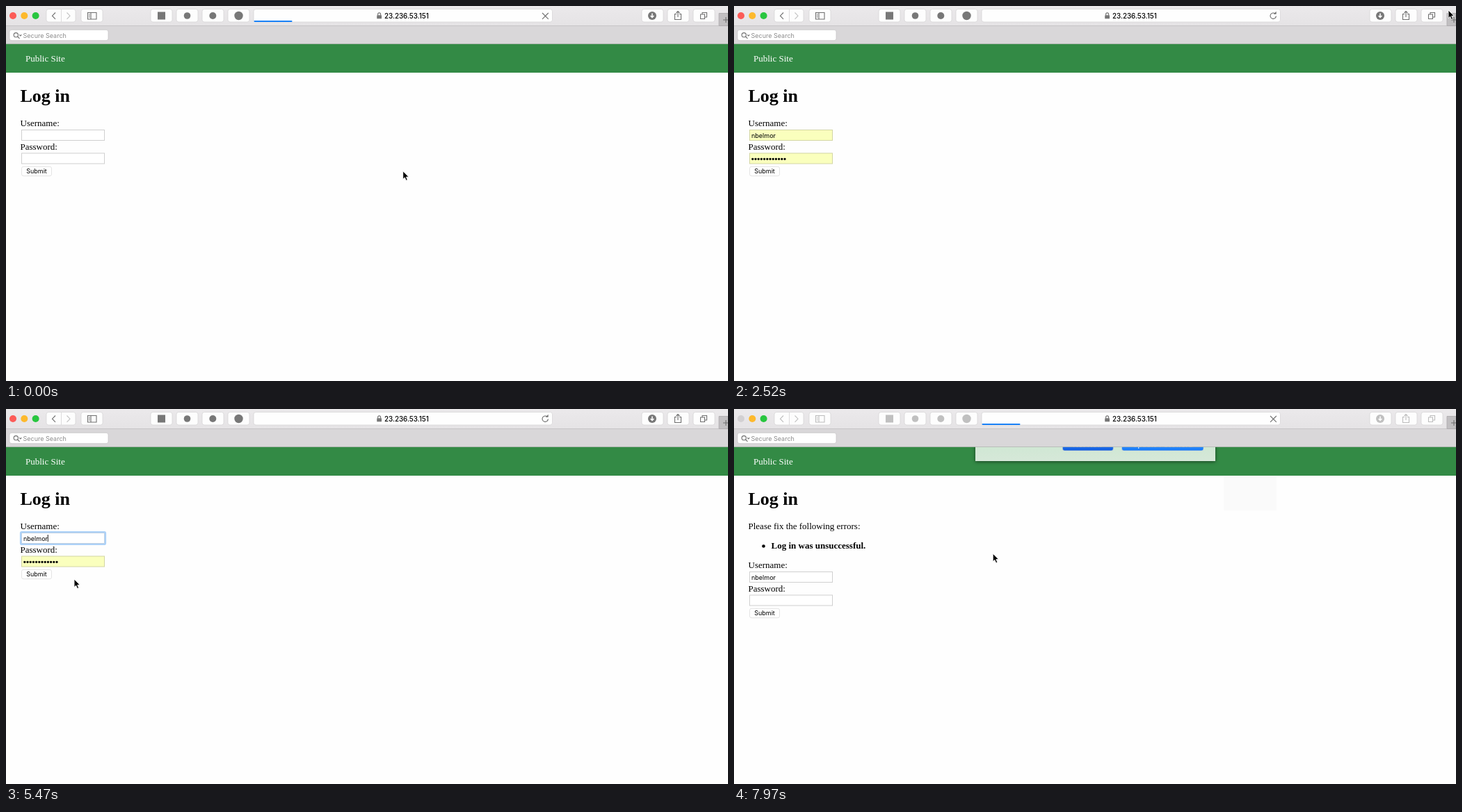
Write an HTML page that moves like this. It is 1038 px wide and 540 px high and loops after 8000 ms.

```html
<!DOCTYPE html>
<html lang="en">
<head>
<meta charset="utf-8">
<title>Log in</title>
<style>
html, body { margin: 0; height: 100%; overflow: hidden; background: #fefefe; }
svg { display: block; width: 1038px; height: 540px; }
text { font: 13px "Liberation Serif", Times, serif; white-space: pre; }
.h1 { font-size: 26px; font-weight: bold; }
.b { font-weight: bold; }
.ui, .btn text { font: 9px Inter, "Liberation Sans", sans-serif; }
.btn text { font-size: 10.4px; text-anchor: middle; }
.ask { font: bold 10.6px Inter, "Liberation Sans", sans-serif; }
.box { fill: #fff; stroke: #cfcfcf; }
.box.filled { fill: #faffbd; stroke: #d3d6a4; }
.ring { fill: none; stroke: #add2f8; stroke-width: 2.6; }
.caret { stroke: #111; }
.line { fill: none; stroke: #6f6f6f; stroke-width: 1.1; }
.dim .icons { opacity: .45; }
.btn rect { fill: #fff; stroke: #d2d4d3; stroke-width: .6; }
.btn.on rect { fill: url(#blue); }
.btn.down rect { fill: url(#deep); }
.btn.on text, .btn.down text { fill: #fff; }
#sheet { filter: drop-shadow(0 1.5px 2.5px rgba(0, 0, 0, .55)); }
</style>
</head>
<body>
<svg viewBox="0 0 1038 540">
<defs>
  <linearGradient id="bar" x2="0" y2="1"><stop stop-color="#ebe9eb"/><stop offset="1" stop-color="#e5e3e5"/></linearGradient>
  <linearGradient id="blue" x2="0" y2="1"><stop stop-color="#58a9fb"/><stop offset="1" stop-color="#1478f8"/></linearGradient>
  <linearGradient id="deep" x2="0" y2="1"><stop stop-color="#4b91f6"/><stop offset="1" stop-color="#0c5be0"/></linearGradient>
  <linearGradient id="glass" gradientUnits="userSpaceOnUse" x1="0" y1="55" x2="0" y2="122">
    <stop stop-color="#d0e7d4"/><stop offset=".35" stop-color="#d7e8d9"/><stop offset="1" stop-color="#ebedec"/>
  </linearGradient>
  <rect id="key" y="4.5" width="31" height="18.5" rx="3.2" fill="#fdfdfd" stroke="#d3d1d3" stroke-width=".7"/>
</defs>

<!-- page -->
<rect width="1038" height="540" fill="#fefefe"/>
<rect y="54" width="1038" height="42" fill="#338a45"/>
<text x="28" y="80" fill="#fff">Public Site</text>
<text class="h1" x="20.5" y="137.5">Log in</text>
<g id="errors">
  <text x="20.5" y="173">Please fix the following errors:</text>
  <circle cx="42.5" cy="197.5" r="2.3"/>
  <text class="b" x="53.5" y="201">Log in was unsuccessful.</text>
</g>
<g id="form">
  <text x="20.5" y="173">Username:</text>
  <rect id="userBox" class="box" x="22.5" y="178.5" width="119" height="15"/>
  <rect id="userRing" class="ring" x="21.2" y="177.2" width="121.6" height="17.6" rx="1.5"/>
  <rect id="picked" x="24.5" y="180" width="36" height="12" fill="#b3d7ff"/>
  <text id="user" class="ui" x="25" y="189.5"></text>
  <path id="userCaret" class="caret" d="M0 181v10"/>
  <text x="20.5" y="206.5">Password:</text>
  <rect id="passBox" class="box" x="22.5" y="212" width="119" height="15"/>
  <rect id="passRing" class="ring" x="21.2" y="210.7" width="121.6" height="17.6" rx="1.5"/>
  <path id="dots" fill="none" stroke="#000" stroke-width="3.3" stroke-linecap="round"/>
  <path id="passCaret" class="caret" d="M0 214.5v10"/>
  <g id="passKey">
    <path d="M128 217v7.5" stroke="#111" stroke-width="2"/><circle cx="128" cy="217" r="2.7"/>
    <path d="M132 218.5l3 3 3-3" fill="none" stroke="#111" stroke-width="1.4"/>
  </g>
  <rect id="submit" x="22.5" y="231.3" width="43" height="13.4" rx="2.6" stroke="#d8d8d8" stroke-width=".7"/>
  <text id="submitText" class="ui" x="44" y="241.3" text-anchor="middle">Submit</text>
</g>
<rect id="ghost" x="704" y="97" width="76" height="49" fill="#fafafa"/>

<!-- password sheet, sliding from under the toolbar -->
<g id="sheet">
  <rect id="panel" x="347" y="50" width="345" fill="url(#glass)"/>
  <g id="content">
    <circle cx="393" cy="95" r="22.8" fill="#1f8be6"/>
    <text class="ask" x="434" y="79.5">Do you want to update the password saved</text>
    <text class="ask" x="434" y="93.5">in your oDrift Lockcase for “nbelmor”?</text>
    <g id="no" class="btn"><rect x="472.3" y="129" width="73" height="17" rx="3"/><text x="508.7" y="141.2">Not Now</text></g>
    <g id="yes" class="btn"><rect x="557.5" y="129" width="117.5" height="17" rx="3"/><text x="616" y="141.2">Update Password</text></g>
  </g>
</g>

<!-- browser window -->
<g id="chrome">
  <rect width="1038" height="29" fill="url(#bar)"/>
  <rect y="28.5" width="1038" height="26" fill="#d9d7d9"/>
  <path d="M0 28.5h1038" stroke="#c6c4c6"/>
  <path d="M0 54.5h1038" stroke="#b3b5b3" stroke-width=".8"/>
  <circle id="close" cx="10" cy="14" r="5"/>
  <circle cx="26.3" cy="14" r="5" fill="#fdb92c"/>
  <circle cx="42.6" cy="14" r="5" fill="#28c63f"/>
  <g id="keys"></g>
  <rect x="58" y="4.5" width="42" height="18.5" rx="3.2" fill="#fdfdfd" stroke="#d3d1d3" stroke-width=".7"/>
  <path d="M79.5 5v18" stroke="#dddbdd"/>
  <path d="M87.5 9.5l4.5 4.7-4.5 4.7" class="line" style="stroke:#c2c2c2"/>
  <g class="icons">
    <path class="line" d="M71 9.5l-4.5 4.7 4.5 4.7M117.5 9.5h12.5v9.5h-12.5zM122 9.5v9.5M119 12h1.6M119 14h1.6M119 16h1.6"/>
    <g fill="#777">
      <rect x="218" y="8.5" width="11" height="11"/>
      <circle cx="260.5" cy="14" r="4.8"/>
      <circle cx="297.3" cy="14" r="5"/>
      <circle cx="334.5" cy="14" r="6.2"/>
      <circle cx="929" cy="14" r="6"/>
    </g>
    <path d="M929 10.5v5.5M926.6 14l2.4 2.5 2.4-2.5" fill="none" stroke="#fff" stroke-width="1.5"/>
    <path class="line" d="M964 11.5h-2.5v8h9v-8h-2.5M966 16v-8M963.5 10l2.5-2.5 2.5 2.5M998.5 12h6v6.5h-6zM1001 12v-2.5h6.5v6.5h-3"/>
  </g>
  <rect x="356" y="4.5" width="429.5" height="18.5" rx="3.2" fill="#fefefe" stroke="#d3d1d3" stroke-width=".7"/>
  <rect id="progress" x="356.5" y="21" height="2" rx="1" fill="#1a82f7"/>
  <rect x="533.2" y="13.3" width="6.8" height="5" rx=".6" fill="#777"/>
  <path class="line" d="M534.6 13.5v-1.6a2 2 0 0 1 4 0v1.6"/>
  <text class="ui" x="544" y="18" style="font-size:9.8px;font-weight:500">23.236.53.151</text>
  <path id="stop" class="line" d="M771 10l8.8 8.8M779.8 10l-8.8 8.8"/>
  <g id="reload"><path class="line" d="M778.2 11.2a4.2 4.2 0 1 0 1.2 3.2"/><path d="M775.6 11.8h4v-4z" fill="#6f6f6f"/></g>
  <path d="M1025 10.5h13v18h-13z" fill="#c1bfc1" stroke="#aaa8aa" stroke-width=".8"/>
  <path class="line" d="M1031 20h8M1035 16v8"/>
  <rect x="5" y="34.3" width="142" height="15.4" rx="3" fill="#fff" stroke="#c4c2c4" stroke-width=".7"/>
  <circle class="line" cx="14.3" cy="41.7" r="3.1"/>
  <path class="line" d="M16.6 44l2.9 2.9M19.2 41.3l1.6 1.6 1.6-1.6"/>
  <text class="ui" x="24.5" y="45.8" fill="#8b8b8b">Secure Search</text>
</g>

<path id="arrow" d="M0 0v11.6l2.6-2.4 1.9 4.3 2.1-.9-1.9-4.2h3.6z" stroke="#fff" stroke-width=".9"/>
<path id="beam" d="M-2.5-6.5Q0-6.5 0-4.5Q0-6.5 2.5-6.5M0-4.5v9M-2.5 6.5Q0 6.5 0 4.5Q0 6.5 2.5 6.5M-1.5 2h3" fill="none" stroke="#111"/>
</svg>
<script>
const $ = id => document.getElementById(id);
const set = (id, attrs) => { for (const k in attrs) $(id).setAttribute(k, attrs[k]); };
const show = (id, on) => { $(id).style.display = on ? '' : 'none'; };
const NAME = 'nbelmor', LOOP = 8000;

$('keys').innerHTML = [108, 208, 245, 282, 319, 914, 951, 988]
  .map(x => `<use href="#key" x="${x}"/>`).join('');

// sheet: hidden part of the sheet's height, -1 when absent
const start = { at: [570.7, 237.8], beam: 0, bar: 55, loading: 1, name: 0, dots: 0, fillUser: 0, fillPass: 0,
  focus: '', caret: 1, picked: 0, submit: 0, sheet: -1, key: 0, down: 0, errors: 0, ghost: 0 };

// Each entry changes some of the state and holds until the next.
const steps = [
  [150, { bar: 150 }],
  [310, { bar: 429, name: 7, dots: 12, fillUser: 1, fillPass: 1 }],
  [470, { loading: 0 }],
  [620, { bar: 0 }],
  [1820, { at: [1028, 497] }],
  [1970, { at: null }],
  [2520, { at: [1027, 6] }],
  [2670, { at: [640, 82] }],
  [2820, { at: [270, 150] }],
  [2960, { at: [112, 184] }],
  [3110, { focus: 'user', picked: 1, fillUser: 0, caret: 0 }],
  [3250, { name: 0, picked: 0, caret: 1 }],
  [3550, { name: 1 }],
  [3850, { name: 2 }],
  [4000, { name: 3 }],
  [4290, { name: 4 }],
  [4580, { name: 6 }],
  [5030, { caret: 0 }],
  [5170, { name: 7, caret: 1 }],
  [5320, { at: [106, 212] }],
  [5470, { at: [98, 245] }],
  [5620, { at: [95.5, 224], beam: 1 }],
  [5770, { focus: 'pass', fillPass: 0, dots: 0 }],
  [5920, { dots: 1 }],
  [6060, { dots: 2 }],
  [6360, { dots: 3 }],
  [6500, { dots: 4 }],
  [6650, { at: [130, 245], beam: 0 }],
  [6800, { at: [190, 278], focus: '', submit: 1 }],
  [6940, { at: [215.5, 286], sheet: 45 }],
  [7090, { sheet: 0 }],
  [7240, { at: [360, 215], key: 1, ghost: 1 }],
  [7380, { at: [492, 137], loading: 1 }],
  [7530, { down: 1, bar: 30 }],
  [7680, { at: [455, 162], bar: 55 }],
  [7820, { at: [405, 190], sheet: 35, submit: 0, dots: 0, errors: 1 }],
  [7970, { at: [372.2, 208.2], sheet: 86 }]
];

function draw(t) {
  const s = Object.assign({}, start, ...steps.filter(([at]) => at <= t).map(([, change]) => change));

  show('errors', s.errors);
  set('form', { transform: `translate(0 ${s.errors ? 56 : 0})` });
  $('user').textContent = NAME.slice(0, s.name);
  $('userBox').classList.toggle('filled', s.fillUser);
  $('passBox').classList.toggle('filled', s.fillPass);
  show('picked', s.picked);
  for (const f of ['user', 'pass']) {
    show(f + 'Ring', s.focus === f);
    show(f + 'Caret', s.focus === f && s.caret);
  }
  show('passKey', s.focus === 'pass');
  const end = s.name ? $('user').getComputedTextLength() : 0;
  set('userCaret', { transform: `translate(${25.3 + end} 0)` });
  set('passCaret', { transform: `translate(${25.9 + s.dots * 4.2} 0)` });
  set('dots', { d: Array.from({ length: s.dots }, (_, i) => `M${26.8 + i * 4.2} 220.3h.01`).join('') });
  set('submit', { fill: s.submit ? 'url(#blue)' : '#fff' });
  set('submitText', { fill: s.submit ? '#fff' : '#000' });
  show('ghost', s.ghost);

  const open = s.sheet >= 0;
  show('sheet', open);
  set('panel', { height: 111 - Math.max(0, s.sheet) });
  set('content', { transform: `translate(0 ${-s.sheet})` });
  $('yes').classList.toggle('on', s.key);
  $('no').classList.toggle('down', s.down);

  $('chrome').classList.toggle('dim', open);
  set('close', { fill: open ? '#d2d0d2' : '#fc5b57' });
  set('progress', { width: s.bar });
  show('stop', s.loading);
  show('reload', !s.loading);

  show('arrow', s.at && !s.beam);
  show('beam', s.at && s.beam);
  if (s.at) set(s.beam ? 'beam' : 'arrow', { transform: `translate(${s.at})` });
}

const t0 = performance.now();
function tick(now) {
  draw(Math.max(0, now - t0) % LOOP);
  requestAnimationFrame(tick);
}
draw(0);
requestAnimationFrame(tick);
</script>
</body>
</html>
```
